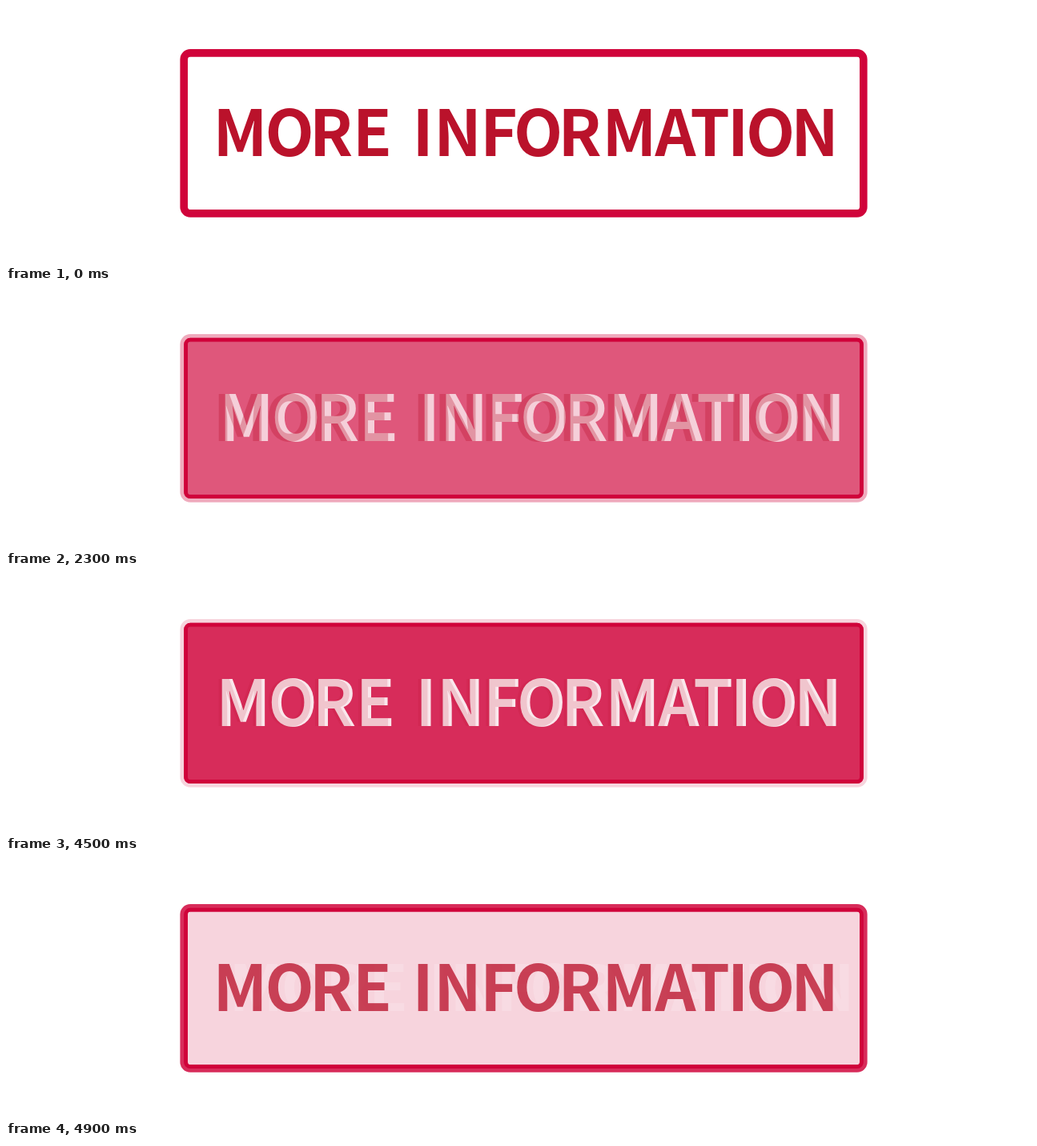
An HTML page that plays this animation: 1280x322 px, repeating every 5000 ms.

```html
<!DOCTYPE html>
<html lang="en">
<head>
<meta charset="utf-8">
<title>More information</title>
<style>
  html, body { margin: 0; width: 100%; height: 100%; overflow: hidden; background: #fff; }
  svg { display: block; width: 100%; height: 100%; }
  text {
    font: bold 79.5px "Noto Sans CJK JP", "Noto Sans CJK SC", "Noto Sans CJK", "Open Sans", sans-serif;
    text-anchor: middle;
    font-kerning: none;
  }
</style>
</head>
<body>
<svg viewBox="0 0 1280 322" fill="none">
  <rect id="border" x="222.2" y="58.8" width="848.6" height="201.2" rx="8" stroke="#d0033a" stroke-width="9.6"/>
  <rect id="fill" x="222.2" y="58.8" width="848.6" height="201.2" rx="8" fill="#d0033a"/>
  <rect x="224.6" y="61.2" width="843.8" height="196.4" rx="5.6" stroke="#d0033a" stroke-width="4.8"/>
  <text id="light" y="188" fill="#fff"></text>
  <text id="dark" y="188" fill="#ba122b"></text>
</svg>
<script>
const LOOP = 5000, HOLD = 2000, STEP = 100, STEPS = 6, SLIDE = 24;
const LABEL = "MORE INFORMATION";
const CENTERS = [292.5, 354, 406, 457.5, 495, 520.5, 564, 615.5, 664.5, 716.5, 778.5, 836, 879, 914, 954.5, 1010];

const [border, fill, light, dark] = ["border", "fill", "light", "dark"].map(id => document.getElementById(id));
for (const label of [light, dark]) {
  label.textContent = LABEL;
  label.setAttribute("x", CENTERS.join(" "));
}

const setOpacity = (node, value) => node.setAttribute("opacity", value);

// 0 = outlined, 1 = filled; the blend moves in whole steps
function blendAt(ms) {
  const half = LOOP / 2;
  const local = ms % half;
  const step = local < HOLD ? 0 : Math.floor((local - HOLD) / STEP) + 1;
  const mix = step / STEPS;
  return ms < half ? mix : 1 - mix;
}

function draw(ms) {
  const mix = blendAt(ms);
  setOpacity(border, 1 - mix);
  setOpacity(fill, mix);
  setOpacity(light, Math.min(1, mix * 1.07));
  setOpacity(dark, mix ? (1 - mix) * 0.92 : 1);
  light.setAttribute("transform", `translate(${SLIDE * (1 - mix)} 0)`);
}

const start = performance.now();
function tick() {
  draw((performance.now() - start) % LOOP);
  requestAnimationFrame(tick);
}
tick();
</script>
</body>
</html>
```
